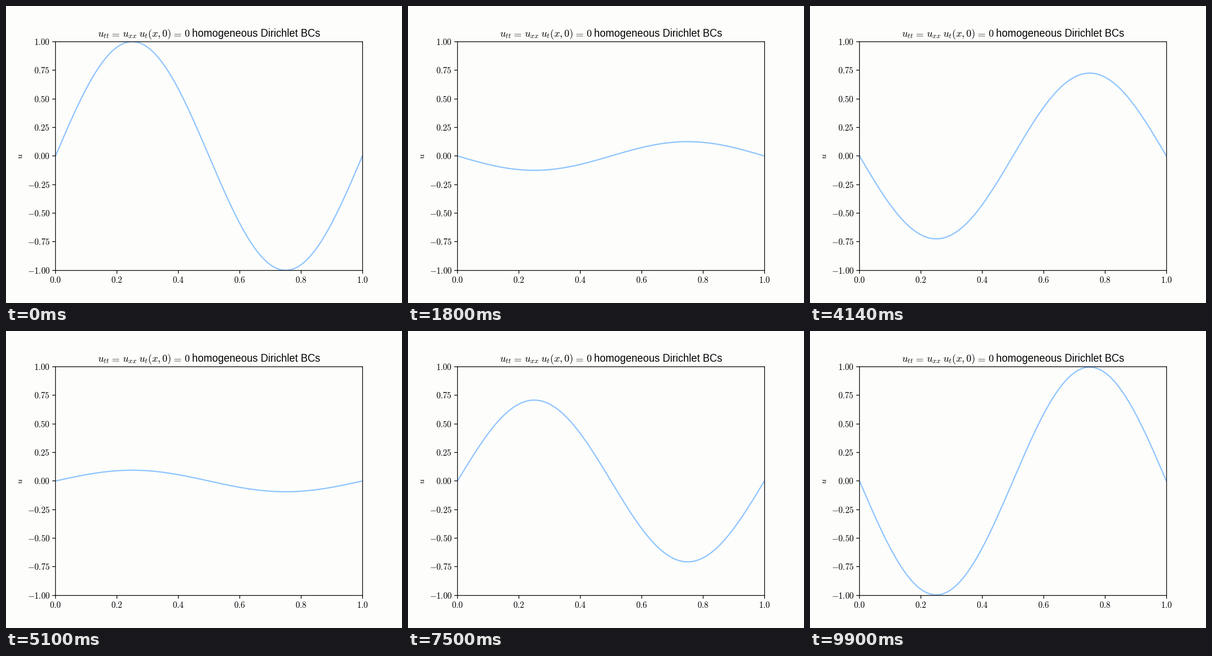
Animation, 864 px wide and 648 px high, one loop 9960 ms. Source, as a matplotlib script:

```python
import numpy as np
import matplotlib.pyplot as plt
from matplotlib.animation import FuncAnimation

W, H, DPI = 864, 648, 135
FRAMES, INTERVAL = 166, 60
DT = 0.009  # wave time per frame
PAPER = "#fdfdfc"

plt.rcParams.update({
    "font.family": "Liberation Sans",
    "mathtext.fontset": "cm",
    "figure.facecolor": PAPER,
    "axes.facecolor": PAPER,
    "savefig.facecolor": PAPER,
})

fig = plt.figure(figsize=(W / DPI, H / DPI), dpi=DPI)
ax = fig.add_axes([0.125, 0.11, 0.775, 0.77])
ax.set_xlim(0, 1)
ax.set_ylim(-1, 1)
ax.set_xticks(np.linspace(0, 1, 6))
ax.set_yticks(np.linspace(-1, 1, 9))
ax.xaxis.set_major_formatter(lambda v, _: f"${v:.1f}$")
ax.yaxis.set_major_formatter(lambda v, _: f"${v:.2f}$")
ax.tick_params(axis="y", pad=3.0)


def put(x, y, text, size, **kw):
    """Place text with its baseline at pixel (x, y), measured from the top left."""
    fig.text(x / W, 1 - y / H, text, fontsize=size, va="baseline", **kw)


# Title terms are set one by one to keep wide spacing around the relations.
TITLE_Y = 67
terms = [
    (199.6, "u_{tt}"), (230.6, "="), (253.7, "u_{xx}"),
    (289.6, "u_t(x,0)"), (365.5, "="), (388.7, "0"),
]
for x, term in terms:
    # An empty group around "=" would add padding, so back up by its own margin.
    shift = 3.9 if term == "=" else 0
    put(x - shift, TITLE_Y, f"${term}$", 11.8)
put(406.5, TITLE_Y, "homogeneous Dirichlet BCs", 12)
put(36, 327.5, "$u$", 10, ha="center", rotation=90, rotation_mode="anchor")

xs = np.linspace(0, 1, 401)
shape = np.sin(2 * np.pi * xs)
line, = ax.plot(xs, shape, color="#92c6ff", lw=1.5)


def update(i):
    line.set_ydata(np.cos(2 * np.pi * DT * i) * shape)
    return line,


anim = FuncAnimation(fig, update, frames=FRAMES, interval=INTERVAL,
                     repeat=True, repeat_delay=0)
plt.show()
```
